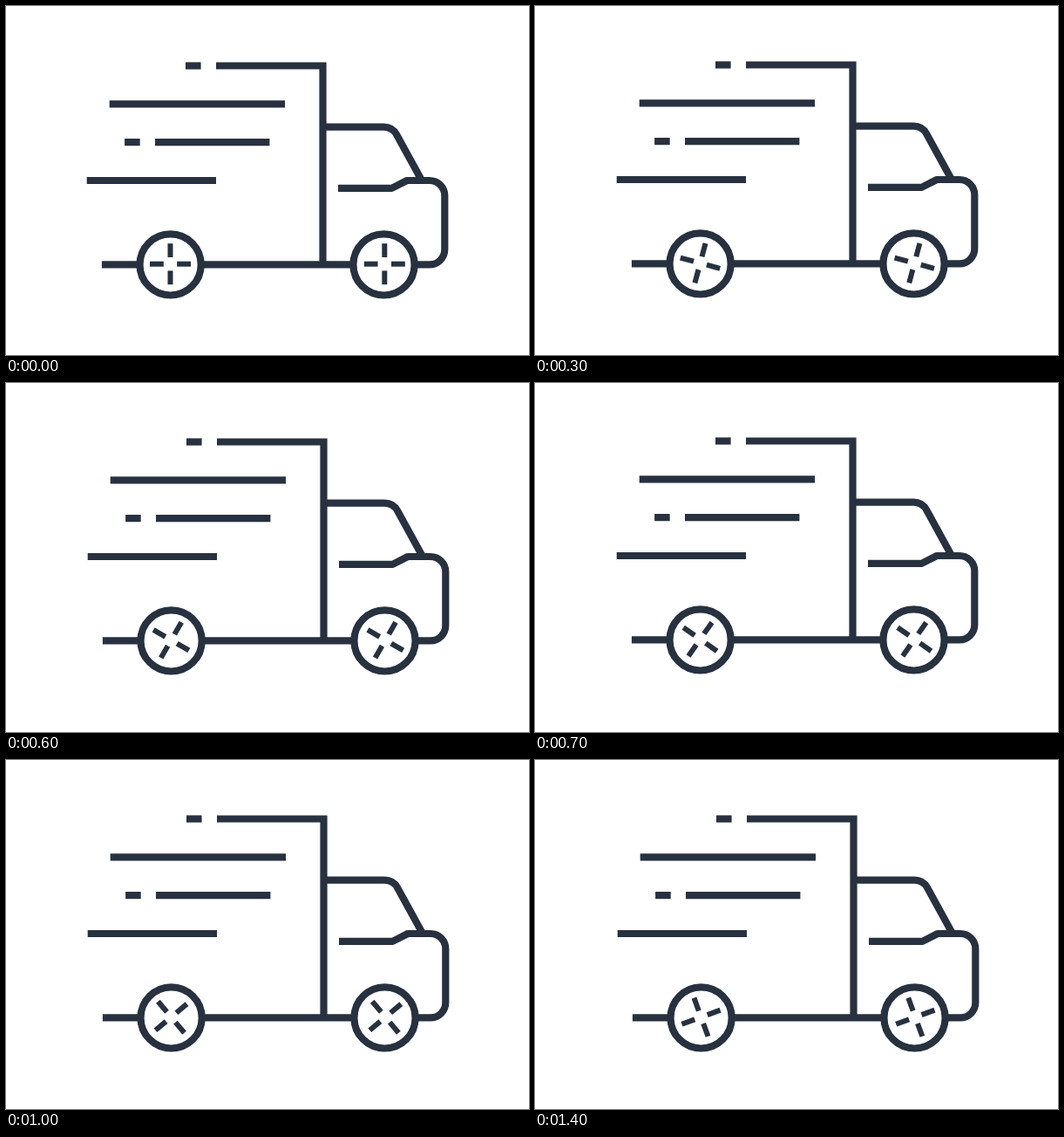
These frames come from a looping animation (600 by 400 pixels, 1500 ms). An HTML page with a canvas:

```html
<!DOCTYPE html>
<html lang="en">
<head>
<meta charset="utf-8">
<title>Delivery van</title>
<style>
html, body { margin: 0; width: 100%; height: 100%; overflow: hidden; background: #fff; }
canvas { display: block; }
</style>
</head>
<body>
<canvas id="stage" width="600" height="400"></canvas>
<script>
const ctx = document.getElementById('stage').getContext('2d');
const INK = '#27313f';
const STEP = 100, STEPS = 15;
const GROUND = 296.4;

// Road shake, one offset per step
const SHAKE_X = [0, 0, 1, 1, 0, 0, 1, 1, 2, 1, 1, 0, 0, 1, 2];
const SHAKE_Y = [0, -1, -1, -1, 0, 0, -1, -2, -2, -1, -1, -1, 0, -1, -1];

function line(...points) {
  ctx.beginPath();
  for (let i = 0; i < points.length; i += 2) ctx.lineTo(points[i], points[i + 1]);
  ctx.stroke();
}

function speedLines() {
  line(206, 68.5, 223.6, 68.5);
  line(118.7, 112.3, 320, 112.3);
  line(136.1, 156.1, 153.7, 156.1);
  line(171, 156.1, 302.4, 156.1);
  line(92.7, 200, 241, 200);
}

function body() {
  ctx.lineJoin = 'miter';
  line(241, 68.5, 363.5, 68.5, 363.5, GROUND + 3.5);
  line(109.9, GROUND, 152, GROUND);
  line(225, GROUND, 398, GROUND);

  ctx.lineJoin = 'round';
  ctx.beginPath();
  ctx.moveTo(364, 138.6);
  ctx.arcTo(443.3, 138.6, 477, 200, 17);
  ctx.lineTo(477, 200);
  ctx.stroke();

  ctx.beginPath();
  ctx.moveTo(381, 208.8);
  ctx.lineTo(442.5, 208.8);
  ctx.lineTo(460, 200);
  ctx.arcTo(503.3, 200, 503.3, 250, 17.3);
  ctx.arcTo(503.3, GROUND, 470, GROUND, 17.3);
  ctx.lineTo(470, GROUND);
  ctx.stroke();
}

function wheel(x, hubX, angle) {
  ctx.beginPath();
  ctx.arc(x, GROUND, 35.1, 0, Math.PI * 2);
  ctx.fill();
  ctx.stroke();

  ctx.save();
  ctx.translate(hubX, 295.7);
  ctx.rotate(angle);
  ctx.lineWidth = 6;
  for (let i = 0; i < 4; i++) {
    line(7.7, 0, 23.5, 0);
    ctx.rotate(Math.PI / 2);
  }
  ctx.restore();
}

function draw(time) {
  const step = Math.floor(time / STEP) % STEPS;
  const angle = step * 5 * Math.PI / 180;
  ctx.fillStyle = '#fff';
  ctx.fillRect(0, 0, 600, 400);
  ctx.save();
  ctx.translate(SHAKE_X[step], SHAKE_Y[step]);
  ctx.strokeStyle = INK;
  ctx.lineWidth = 8.2;
  speedLines();
  body();
  wheel(188.6, 188.5, angle);
  wheel(433.5, 434.3, angle);
  ctx.restore();
}

const start = performance.now();
function tick() {
  draw(performance.now() - start);
  requestAnimationFrame(tick);
}
tick();
</script>
</body>
</html>
```
